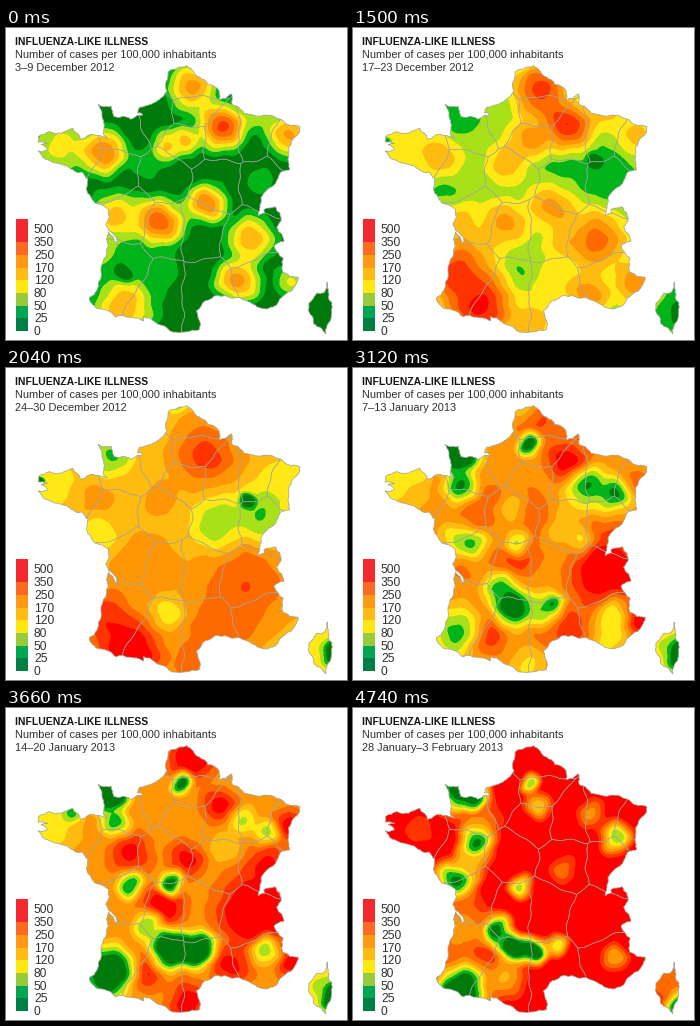
Animation of 341x312 px, one loop 5760 ms. Source, as a matplotlib script:

```python
import numpy as np
import matplotlib.pyplot as plt
from matplotlib.animation import FuncAnimation
from matplotlib.patches import PathPatch, Rectangle
from matplotlib.path import Path

W, H, DPI = 341, 312, 100
STEP, LOOP = 60, 5760  # ms
GREY = "#a3a59c"

# Map colours from the lowest class to the highest
CLASSES = ["#007a0a", "#00b41a", "#a8e01a", "#ffe814", "#ffbb10",
           "#ff9605", "#ff6a00", "#ff3400", "#ff0000"]
KEY = ["#007f45", "#00a650", "#97ca3d", "#ffe812", "#ffbb14",
       "#ff9812", "#fb6a20", "#f4282f", "#f4282f"]
BREAKS = [0, 25, 50, 80, 120, 170, 250, 350, 500]

# Key points of the coast and frontier (longitude, latitude)
NORTH_WEST = [
    (2.54, 51.09), (1.85, 50.96), (1.58, 50.87), (1.55, 50.25), (1.08, 49.93),
    (.19, 49.7), (.07, 49.52), (.35, 49.45), (-.25, 49.29), (-1.12, 49.36),
    (-1.25, 49.69), (-1.62, 49.65), (-1.94, 49.72), (-1.6, 49.2), (-1.57, 48.74),
    (-1.37, 48.64), (-1.85, 48.7), (-2.7, 48.53), (-3.1, 48.87), (-3.65, 48.69),
    (-4.77, 48.52), (-4.78, 48.33), (-4.3, 48.33), (-4.62, 48.25),
    (-4.28, 48.12), (-4.73, 48.04), (-4.37, 47.8), (-3.12, 47.57),
    (-2.5, 47.47), (-2.2, 47.25), (-2.23, 46.9), (-1.8, 46.49), (-1.12, 46.3),
    (-1.22, 45.8), (-.62, 45.1), (-1.07, 45.56), (-1.25, 44.65),
    (-1.45, 43.65), (-1.78, 43.37)]
SOUTH_EAST = [
    (-1.45, 43.05), (-.55, 42.79), (.67, 42.69), (.67, 42.84), (1.72, 42.5),
    (2.0, 42.35), (3.17, 42.43), (3.05, 43.05), (4.0, 43.55), (5.3, 43.36),
    (5.93, 43.1), (6.65, 43.18), (7.53, 43.78), (7.7, 44.05), (7.0, 44.24),
    (7.05, 44.7), (6.65, 45.11), (7.13, 45.25), (6.82, 45.72), (7.04, 45.92),
    (6.8, 46.4), (6.25, 46.31), (6.3, 46.22), (5.97, 46.13), (6.07, 46.46),
    (6.95, 47.28), (7.1, 47.49), (7.58, 47.58), (7.58, 48.05), (7.8, 48.55),
    (8.23, 48.97), (7.45, 49.17), (6.55, 49.42), (5.47, 49.5), (4.87, 49.8),
    (4.85, 50.15), (4.2, 49.96), (4.2, 50.27), (3.65, 50.46), (3.2, 50.72),
    (2.54, 51.09)]

# The island is an inset, so it is placed directly in pixels
ISLAND = [(321, 254), (318, 265), (311, 265), (303, 275), (305, 287), (308, 296),
          (320, 306), (325, 290), (326, 275), (322, 264), (321, 254)]

# Region centres; the borders run halfway between neighbours
REGIONS = [(185, 56), (185, 83), (150, 89), (120, 101), (69, 123), (109, 147),
           (157, 148), (179, 111), (218, 110), (249, 108), (281, 119),
           (256, 154), (212, 156), (124, 186), (160, 200), (194, 200),
           (241, 210), (118, 242), (154, 262), (200, 263), (257, 253)]

# Spots per week: x, y, radius, class reached at the centre
DEC_3 = [
    (55, 118, 55, 3.3), (98, 124, 36, 6), (186, 60, 38, 5.4), (216, 99, 38, 7.4),
    (178, 112, 26, 4.4), (160, 120, 26, 4.2), (250, 84, 30, 3.2),
    (284, 106, 38, 5.2), (201, 175, 32, 6), (153, 194, 40, 6.8),
    (110, 188, 40, 4.6), (118, 278, 50, 4.8), (92, 220, 44, 2.7),
    (140, 240, 55, 1.9), (245, 211, 38, 4.8), (232, 252, 36, 5.5),
    (284, 254, 26, 3.2), (140, 135, 30, 1.6), (255, 152, 24, 1.7),
    (118, 246, 16, 0)]
DEC_10 = [
    (50, 112, 60, 4.2), (85, 128, 38, 3.9), (186, 60, 44, 9), (216, 99, 40, 9.3),
    (176, 112, 32, 6), (155, 133, 36, 4.2), (254, 85, 32, 4), (284, 108, 38, 5.4),
    (201, 175, 40, 6.9), (153, 195, 36, 5.4), (105, 193, 36, 4),
    (244, 212, 44, 6), (214, 212, 30, 3.6), (285, 256, 36, 7), (237, 268, 34, 5),
    (108, 242, 62, 7.4), (130, 275, 52, 7.7), (175, 298, 36, 3)]
DEC_24 = [
    (140, 200, 65, 5.4), (155, 130, 30, 5.4), (90, 130, 30, 5.4),
    (200, 85, 55, 7.1), (202, 90, 20, 7.8), (240, 218, 75, 6.9),
    (212, 262, 60, 6.8), (239, 219, 6, 8), (98, 250, 50, 7.8),
    (126, 284, 54, 9.3), (185, 295, 36, 6.7), (105, 88, 36, 1.8),
    (174, 36, 16, 2), (32, 112, 9, -2), (45, 115, 45, 3.3), (255, 145, 48, 1.9),
    (210, 155, 44, 2.2), (240, 132, 13, -1), (280, 112, 42, 3.2),
    (94, 165, 30, 3.1), (162, 246, 24, 3.2), (318, 280, 46, 3), (328, 286, 18, -2)]
DEC_31 = [
    (215, 90, 40, 9.4), (258, 200, 52, 9.3), (238, 222, 32, 7.5),
    (286, 256, 28, 9), (181, 130, 32, 6.7), (140, 123, 22, 6.7),
    (177, 186, 28, 7.2), (132, 272, 30, 7.8), (205, 262, 42, 7.9),
    (110, 205, 24, 6.6), (45, 112, 50, 4.2), (108, 88, 34, -2),
    (107, 122, 26, -.6), (174, 40, 22, 1), (176, 76, 20, -.5),
    (106, 171, 28, -.6), (162, 142, 26, 3), (235, 120, 36, -1.5),
    (262, 130, 34, -1.5), (228, 172, 22, .8), (205, 160, 26, 3),
    (153, 222, 30, -.5), (154, 240, 24, -.5), (201, 235, 14, 1.5),
    (178, 297, 32, -1), (256, 266, 34, .9), (318, 280, 46, 2.6), (328, 286, 24, -2)]
JAN_14 = [
    (185, 52, 36, 9.2), (213, 98, 28, 8.6), (285, 118, 26, 9), (262, 155, 34, 8.2),
    (125, 145, 34, 8.4), (180, 153, 30, 8.5), (157, 198, 34, 9),
    (250, 203, 62, 10), (140, 264, 30, 8.1), (182, 295, 34, 8.7),
    (225, 258, 32, 8.5), (286, 256, 26, 9), (40, 114, 60, 3), (65, 106, 16, 1.5),
    (104, 88, 30, -2), (110, 115, 24, 1.4), (175, 75, 18, 0), (238, 112, 24, 2.8),
    (260, 125, 20, 2.6), (218, 140, 26, 4), (123, 177, 22, 1), (165, 174, 20, 0),
    (140, 218, 24, 2), (165, 242, 32, -2.5), (190, 241, 30, -2),
    (102, 264, 42, -2), (260, 243, 24, 2.4), (318, 280, 46, 2.6),
    (328, 290, 20, -2)]
JAN_28 = [
    (105, 84, 38, 0), (120, 88, 26, .3), (128, 110, 36, 6), (177, 75, 16, 2),
    (185, 97, 22, 4.2), (123, 136, 30, .6), (102, 172, 34, .5),
    (118, 155, 28, 4.5), (168, 178, 20, 2.6), (210, 161, 24, 6.4),
    (263, 130, 26, 2), (238, 105, 24, 5.6), (67, 122, 26, 7), (143, 222, 26, 0),
    (160, 241, 26, -1.5), (180, 243, 24, -1), (204, 238, 18, 3),
    (108, 282, 46, -2), (108, 222, 50, 5.2), (105, 200, 40, 6.4),
    (152, 268, 36, 4.8), (262, 250, 22, 5), (315, 272, 40, 6), (325, 298, 22, 0)]

rng = np.random.default_rng(7)


def project(points):
    """Lambert conformal conic, straight to pixels."""
    lon, lat = np.radians(np.array(points, float)).T
    lat0 = np.radians(46.5)
    n, r0 = np.sin(lat0), 1656.5
    r = r0 * (np.tan(np.pi / 4 + lat0 / 2) / np.tan(np.pi / 4 + lat / 2)) ** n
    a = n * (lon - np.radians(3))
    return np.column_stack([189.4 + r * np.sin(a), 177.6 - r0 + r * np.cos(a)])


def roughen(line, amount=.14, rounds=3):
    """Midpoint displacement for a natural-looking coast."""
    line = np.array(line, float)
    for _ in range(rounds):
        step = np.diff(line, axis=0)
        side = step[:, ::-1] * [-1, 1] * rng.uniform(-amount, amount, (len(step), 1))
        out = np.empty((2 * len(line) - 1, 2))
        out[::2] = line
        out[1::2] = line[:-1] + step / 2 + side
        line = out
    return line


# Half-pixel grid, with a slightly wavy copy for organic contours
GX, GY = np.meshgrid(np.arange(.25, W, .5), np.arange(.25, H, .5))
WX = GX + 1.5 * np.sin(GY / 7 + GX / 23) + .7 * np.sin(GY / 3.1)
WY = GY + 1.5 * np.sin(GX / 8 - GY / 19) + .7 * np.sin(GX / 3.4)


def surface(base, spots):
    """Hot spots only raise the base level, cold ones only lower it."""
    field = np.full(GX.shape, float(base))
    for x, y, radius, level in spots:
        d = np.minimum(np.hypot(WX - x, WY - y) / radius, 1)
        limit = np.maximum if level > base else np.minimum
        field += (1 + np.cos(np.pi * d)) / 2 * limit(level - field, 0)
    return field


PALETTE = np.array([[int(c[i:i + 2], 16) for i in (1, 3, 5)] for c in CLASSES]) / 255


def paint(field):
    rgb = PALETTE[np.clip(np.floor(field), 0, 8).astype(int)]
    return rgb.reshape(H, 2, W, 2, 3).mean(axis=(1, 3))


dec3, dec10, dec24 = surface(.4, DEC_3), surface(.3, DEC_10), surface(4.7, DEC_24)
dec31, jan14, jan28 = surface(5.2, DEC_31), surface(5.7, JAN_14), surface(9, JAN_28)

# Start in ms, caption, field
WEEKS = [
    (0, "3–9 December 2012", dec3),
    (1020, "10–16 December 2012", dec10),
    (1500, "17–23 December 2012", (dec10 + dec24) / 2),
    (2040, "24–30 December 2012", dec24),
    (2640, "31 December 2012\n–6 January 2013", dec31),
    (3120, "7–13 January 2013", (dec31 + jan14) / 2),
    (3660, "14–20 January 2013", jan14),
    (4140, "21–27 January 2013", (jan14 + jan28) / 2),
    (4740, "28 January–3 February 2013", jan28)]
STARTS = [week[0] for week in WEEKS]
MAPS = [paint(week[2]) for week in WEEKS]

fig = plt.figure(figsize=(W / DPI, H / DPI), dpi=DPI, facecolor="white")
ax = fig.add_axes([0, 0, 1, 1])
ax.axis("off")


def label(x, y, text, px, color="#303030", **kw):
    return ax.text(x, y, text, fontsize=px * 72 / DPI, family="Liberation Sans",
                   color=color, va="baseline", **kw)


land = Path.make_compound_path(Path(roughen(project(NORTH_WEST + SOUTH_EAST))),
                               Path(roughen(ISLAND)))
heat = ax.imshow(MAPS[0], extent=(0, W, H, 0), aspect="auto",
                 interpolation="nearest")
heat.set_clip_path(land, ax.transData)
ax.add_patch(PathPatch(land, fill=False, ec=GREY, lw=.55))

# Borders stay on the mainland, west of the inset
far = np.array([np.hypot(WX - x, WY - y) for x, y in REGIONS])
for i in range(len(REGIONS)):
    gap = far[i] - np.delete(far, i, axis=0).min(axis=0)
    edge = ax.contour(GX, GY, np.where(GX < 298, gap, np.nan), levels=[0],
                      colors=GREY, linewidths=.4)
    edge.set_clip_path(land, ax.transData)
ax.set_xlim(0, W)
ax.set_ylim(H, 0)

for i, (value, color) in enumerate(zip(BREAKS, KEY)):
    bottom = 303 - 12.7 * i
    top = 191 if i == 8 else bottom - 12.7
    ax.add_patch(Rectangle((10, top), 12, bottom - top, fc=color, lw=0))
    label(28, bottom + 4, str(value), 12)

label(9, 17.2, "INFLUENZA-LIKE ILLNESS", 10.35, "#151515", weight="bold")
label(9, 29.8, "Number of cases per 100,000 inhabitants", 11.05)
dates = [label(9, y, "", 11.05) for y in (42.6, 55)]


def update(tick):
    week = np.searchsorted(STARTS, tick * STEP, side="right") - 1
    heat.set_data(MAPS[week])
    lines = WEEKS[week][1].split("\n") + [""]
    for text, words in zip(dates, lines):
        text.set_text(words)
    return [heat, *dates]


anim = FuncAnimation(fig, update, frames=LOOP // STEP, interval=STEP, repeat=True)
plt.show()
```
